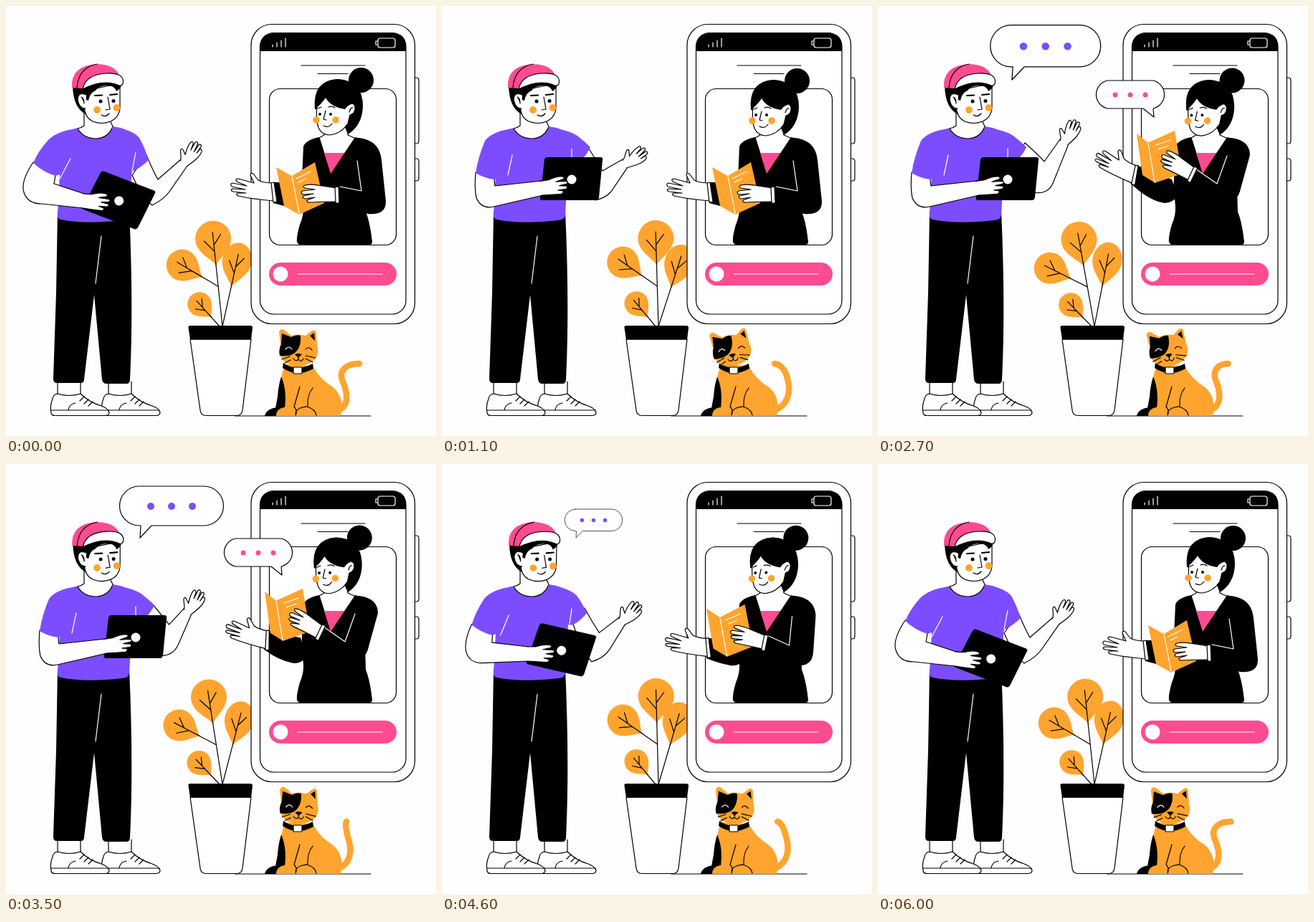
Write an HTML page that moves like this. It is 600 px wide and 600 px high and loops after 6100 ms.

```html
<!DOCTYPE html>
<html lang="en">
<head>
<meta charset="utf-8">
<title>Video call</title>
<style>
html, body { margin: 0; width: 100%; height: 100%; overflow: hidden; background: #fefdff; }
svg { display: block; width: 100%; height: 100%; }
.w { fill: #fff; stroke: #000; }
.l { fill: none; stroke: #000; }
.wl { fill: none; stroke: #fff; }
.v { fill: #7b4dff; }
.p { fill: #ff4b91; }
.o { fill: #ffa42e; }
.h { fill: #fff; }
.w, .l, .wl { stroke-width: 1.2; stroke-linecap: round; stroke-linejoin: round; }
.brow { stroke-width: 2.2; }
#leaf path { vector-effect: non-scaling-stroke; }
</style>
</head>
<body>
<svg viewBox="0 0 600 600">
<defs>
  <g id="leaf">
    <path class="o" d="M0 0C-7 -10 -25 -20 -25 -37A25 25 0 0 1 25 -37C25 -20 7 -10 0 0Z"/>
    <path class="l" d="M0 0V-46M0 -19L-13 -35M0 -28L11 -42"/>
  </g>
  <g id="shoe">
    <path class="w" d="M72 524V544H104V524"/>
    <path class="w" d="M72 541Q66 542 65 548Q61 558 63 568Q64 571.500 68 571.500H139Q144 571 144 567Q142 561 133 558Q116 553 104 541Q88 546 72 541Z"/>
    <path class="l" d="M63 564H143M103 551L109 545M109 555L115 549M115 558L121 552M87 563Q89 555 97 554"/>
  </g>
</defs>

<path class="l" d="M320 572H509"/>

<!-- plant -->
<g id="right"><path class="l" d="M0 0V-60"/><use href="#leaf" transform="translate(0 -57) scale(.82 1)"/></g>
<g id="top">
  <path class="l" d="M0 0V-88"/>
  <use href="#leaf" transform="translate(0 -86)"/>
  <g transform="translate(0 -56) rotate(-53.5)"><path class="l" d="M0 0V-28"/><use href="#leaf" transform="translate(0 -26) scale(.88)"/></g>
</g>
<g id="small"><path class="l" d="M0 0V-20"/><use href="#leaf" transform="translate(0 -17) scale(.67)"/></g>
<path class="w" d="M257 465L271 564Q272 571.500 279 571.500H322Q329 571.500 330 564L342 465Z"/>
<path d="M257 446H341Q344 446 344 449L342 465.500H257L254.500 449Q254 446 257 446Z"/>

<!-- phone -->
<g class="w">
  <path d="M570 100H573Q576 100 576 104V188Q576 192 573 192H570M570 213H573Q576 213 576 217V240Q576 244 573 244H570"/>
  <rect x="342" y="25.500" width="228.500" height="418" rx="29"/>
  <rect x="354.500" y="37.500" width="203.500" height="392.500" rx="19"/>
</g>
<path d="M355 63V56Q355 38 374 38H539Q558 38 558 56V63Z"/>
<path class="wl" d="M372 57V54M378 57V51M384 57V48M390 57V45"/>
<path class="wl" d="M522 45H540Q543 45 543 48V55Q543 58 540 58H522Q519 58 519 55V48Q519 45 522 45ZM519 49H516V54H519"/>
<path class="l" d="M412 83H501M435 94.500H477"/>
<rect class="w" x="367.500" y="115.500" width="177" height="218" rx="15"/>
<rect class="p" x="367" y="358" width="178" height="32" rx="16"/>
<circle class="h" cx="383" cy="374" r="10.500"/>
<path class="wl" d="M407 374H525"/>

<!-- woman -->
<path class="w" d="M444 170V180L437 184L453 234L488 185L477 180V165Z"/>
<path class="p" d="M441 205H477L453 235Z"/>
<path d="M437 183Q418 187 415 196L412 262Q419 285 410 305Q405 322 406 329Q407 333 411 333H507Q511 333 511 329Q508 302 502 287L499 186L487 183L453 234Z"/>
<path id="wSleeve"/>
<path id="wArm"/>
<path id="wCrease" class="wl"/>
<g id="wWave">
  <path class="w" d="M3 -13C-6 -13 -14 -14 -19 -17L-26 -26Q-30 -28 -30 -24L-25 -13L-47 -19Q-52 -19 -49 -15L-35 -9L-55 -13Q-59 -12 -56 -8L-37 -4L-55 -5Q-59 -3 -54 -1L-36 1L-48 1Q-51 3 -47 5C-34 8 -20 10 3 12"/>
  <path class="w" d="M-1 -13L3 -14L7 13L2 14Z"/>
</g>
<path id="bookL" class="o"/>
<path id="bookR" class="o"/>
<path id="bookLine" class="wl"/>
<g id="wHold">
  <path class="w" d="M0 -9L-20 -12Q-34 -15 -44 -13Q-48 -11 -44 -9L-30 -7L-47 -5Q-51 -3 -47 0L-32 -1L-46 2Q-48 5 -44 6L-30 4L-41 8Q-42 11 -37 11Q-20 10 0 10"/>
  <path class="w" d="M-2 -10L3 -11L4 12L-1 12Z"/>
</g>
<g id="wHead">
  <circle cx="495.500" cy="103.500" r="17.500"/>
  <path d="M431 144Q429 103 463 102Q498 104 498 140Q497 167 477 179L465 150Z"/>
  <path class="w" d="M434 137Q432 158 436 170Q441 180 452 180Q468 178 477 164L480 152Q488 150 487 140Q483 132 477 139L470 140Q454 137 446 124Z"/>
  <path d="M431 144Q427 104 463 102Q492 104 494 132L477 139L473 144Q453 141 446 128Q440 137 431 144Z"/>
  <path class="l" d="M479 148Q481 141 484 142M446 146L443 158L447 159M443 167Q450 171 455 164M435 143L440 141M450 141Q455 139 459 142"/>
  <circle cx="438" cy="151" r="2"/><circle cx="453" cy="151" r="2"/>
  <circle class="o" cx="433" cy="159" r="4.800"/><circle class="o" cx="460" cy="159" r="4.800"/>
</g>

<!-- man -->
<path id="mArm" class="w"/>
<g id="mWave"><path class="w" d="M-1 -6C4 -7 6 -12 11 -15Q15 -16 13 -12L10 -6C16 -9 22 -11 28 -11Q32 -10 29 -7L20 -4L32 -6Q36 -5 33 -2L21 1L33 0Q36 2 33 4L22 5L29 5Q31 7 28 9C20 12 10 9 -1 6"/></g>
<use href="#shoe" x="71"/>
<use href="#shoe"/>
<path d="M72 286L70 400L66 520Q66 526 71 526H104Q109 526 109 521L123 403L134 521Q135 527 140 527H168Q173 527 173 521Q178 420 172 286Z"/>
<path class="wl" d="M133 321L125 387"/>
<path class="v" d="M101 170Q124 196 149 168L160 170Q175 174 178 190L172 291Q172 298 162 299Q110 305 77 298Q71 297 72 290L75 235L72 200Q75 175 101 170Z"/>
<path class="w" d="M109 146V167Q105 170 100 171Q108 185 126 185Q143 184 149 168L146 162V150Z"/>
<path id="mSleeveR" class="v"/>
<path id="mCreaseR" class="wl"/>
<g id="laptop">
  <path d="M-34 -30H40Q44 -30 43 -26L38 26Q37 30 34 30H-41Q-45 30 -44 26L-38 -27Q-37 -30 -34 -30Z"/>
  <circle class="h" cx="0" cy="1" r="6.500"/>
</g>
<path id="mArmL" class="w"/>
<g id="mHold"><path class="w" d="M-2 -10L10 -10Q22 -14 30 -12Q34 -10 30 -8L20 -6L34 -5Q38 -3 34 -1L24 0L34 2Q36 5 32 6L21 6L28 8Q29 11 25 12Q10 11 -2 10"/></g>
<path id="mSleeveL" class="v"/>
<path id="mCreaseL" class="wl"/>
<g id="mHead">
  <path d="M93 112Q94 142 111 151L118 116Z"/>
  <path class="w" d="M112 118L109 140Q110 156 121 161Q134 166 146 161Q159 155 159 140V108Z"/>
  <path d="M105 115L135 100L162 106Q161 115 154 119Q151 111 142 111Q130 111 125 118Q117 121 115 132L108 130Z"/>
  <path class="w" d="M112 124Q101 119 100 130Q102 143 111 143M105 127Q109 128 109 136"/>
  <path class="p" d="M92 114Q90 84 125 81Q152 81 158 97Q118 92 107 115Z"/>
  <path class="w" d="M107 116Q111 95 141 94Q164 93 163.500 106Q163 112 158 111Q136 101 107 116Z"/>
  <path class="l" d="M99 114Q101 86 127 81"/>
  <path class="l" d="M142 127L145 144L139 145M133 152Q139 156 144 150"/>
  <path class="l brow" d="M124 125L134 124.500M145 124L155 123"/>
  <circle cx="132" cy="133" r="2.500"/><circle cx="150" cy="132.500" r="2.500"/>
  <circle class="o" cx="127" cy="145" r="4.900"/><circle class="o" cx="154.500" cy="142" r="4.900"/>
</g>

<!-- cat -->
<path id="tail" fill="none" stroke="#ffa42e" stroke-width="8.500" stroke-linecap="round"/>
<path d="M390 505L378 560Q363 562 361 572H390Z"/>
<path class="o" d="M391 500Q381 515 386 530Q391 545 388 560Q378 562 377 572H467Q473 545 455 531Q437 520 428 502Z"/>
<path d="M384 517Q394 540 387 572H374L379 545Q380 530 384 517Z"/>
<path class="o" d="M388 560Q377 562 377 572H404V561Z"/>
<path class="l" d="M410 531L402 559Q407 564 404 571M428 533Q420 543 421 559M404 568Q406 560 420 559Q432 563 433 571"/>
<path d="M387 498Q405 511 428 499L429 506Q406 519 386 505Z"/>
<rect class="w" x="401" y="504" width="12" height="9" rx="1"/>
<g id="catHead">
  <path class="o" d="M381 455Q383 449 388 452L398 460Q408 457 418 460L427 453Q432 451 433 456L434 474Q439 489 425 498Q408 506 391 498Q378 488 383 473Z"/>
  <path d="M385 457L398 462Q406 458 411 460Q412 474 406 481Q399 490 382 488Q380 480 384 472ZM424 460L430 456L431 467Z"/>
  <path class="wl" d="M390 479Q395 473 399 479"/>
  <path class="l" d="M418 479Q422 474 427 480M408 490V493M401 492Q404 497 408 493Q412 498 415 492M418 488L432 491M418 492L428 497M396 489L385 493M397 494L389 498"/>
  <path d="M403 486Q408 484 413 486L408 491Z"/>
</g>

<!-- speech -->
<g id="talkM">
  <path class="w" d="M186 31H276A27.500 27.500 0 0 1 276 86H203L187 103L188 86H186A27.500 27.500 0 0 1 186 31Z"/>
  <g class="v"><circle cx="202" cy="59" r="5"/><circle cx="231" cy="59" r="5"/><circle cx="260" cy="59" r="5"/></g>
</g>
<g id="talkW">
  <path class="w" d="M320 104H384A20 20 0 0 1 384 143L385 155L370 143H320A20 20 0 0 1 320 104Z"/>
  <g class="p"><circle cx="331" cy="124" r="3.500"/><circle cx="352" cy="124" r="3.500"/><circle cx="373" cy="124" r="3.500"/></g>
</g>
</svg>
<script>
const LOOP = 6100, STEP = 100;
const $ = id => document.getElementById(id);
const clamp = x => Math.max(0, Math.min(1, x));
const ease = p => 0.5 - 0.5 * Math.cos(Math.PI * p);
const number = /-?\d+(\.\d+)?/g;

// Blend two numbers, or two strings holding the same count of numbers.
function mix(a, b, p) {
  if (typeof a === 'number') return a + (b - a) * p;
  const to = b.match(number);
  let i = 0;
  return a.replace(number, n => (+n + (to[i++] - n) * p).toFixed(2));
}

function key(t, keys) {
  let i = 1;
  while (i < keys.length - 1 && t > keys[i][0]) i++;
  const [t0, a] = keys[i - 1], [t1, b] = keys[i];
  return mix(a, b, ease(clamp((t - t0) / (t1 - t0))));
}

const tracks = [];
const move = (id, attr, keys) => tracks.push([$(id), attr, keys]);
const lift = ([up0, up1, down0, down1]) => (id, attr, a, b) =>
  move(id, attr, [[up0, a], [up1, b], [down0, b], [down1, a]]);
const turn = (id, x, y, keys) =>
  move(id, 'transform', keys.map(([t, r]) => [t, `translate(${x} ${y}) rotate(${r})`]));
const marks = [0, 1100, 1800, 2700, 4200, 5100, LOOP];
const poses = (id, attr, list) => move(id, attr, list.map((v, i) => [marks[i], v]));
const place = (x, y, r) => `translate(${x} ${y}) rotate(${r})`;

// plant
const sway = (mid, amp) => [[0, mid], [1450, mid + amp], [3000, mid - amp], [4600, mid + amp * 0.9], [LOOP, mid]];
turn('top', 302, 447, sway(-6, 5));
turn('small', 298, 447, sway(-42, 2.5));
turn('right', 302, 447, marks.map((t, i) => [t, [12.5, 18, 12, 11, 17.5, 15, 12.5][i]]));

// man: laptop arm
const hold = lift([100, 1050, 4000, 5050]);
hold('laptop', 'transform', place(158, 271, 21), place(181, 241, 0));
hold('mHold', 'transform', place(109, 272, 4), place(140, 254, -8));
hold('mArmL', 'd',
  'M109 262L67 248Q68 243 69 236L38 218Q20 245 25 260Q30 276 50 276L108 282',
  'M139 244L74 251Q73 247 73 241L47 232Q45 255 48 268Q55 284 72 280L141 264');
hold('mSleeveL', 'd',
  'M98 171Q70 175 58 188Q44 204 38 219Q52 232 69 237L78 234Q90 215 98 190Z',
  'M98 171Q70 175 60 188Q50 212 47 233Q58 240 73 242L80 238Q92 215 98 190Z');
hold('mCreaseL', 'd', 'M90 213L75 241', 'M98 208L92 236');
hold('mCreaseR', 'd', 'M181 204L176 230', 'M181 199L181 212');
hold('mSleeveR', 'd',
  'M148 169Q176 172 186 184Q193 196 199 215Q188 226 174 232L160 220Q150 190 148 169Z',
  'M148 169Q178 173 190 182Q200 190 207 197Q203 206 196 213L172 230Q160 190 148 169Z');

// man: free arm
const armLow = 'M244 214L212 242Q206 232 196 208L176 236Q190 268 204 278Q220 270 228 259L253 223';
const armOut = 'M252 214L224 230Q215 215 203 196L190 215Q200 255 214 271Q228 268 236 259L259 225';
const armUp = 'M246 188L230 217Q222 206 205 191L196 206Q205 240 217 262Q236 268 242 250L258 196';
const armHigh = 'M254 186L232 217Q222 206 205 191L196 206Q205 240 217 260Q238 264 245 245L265 195';
const armBack = 'M244 214L224 230Q213 214 201 196L188 215Q200 255 212 273Q228 272 236 259L253 223';
const armWide = 'M252 214L213 243Q206 232 196 208L176 236Q190 268 204 280Q222 270 231 258L259 225';
poses('mArm', 'd', [armLow, armOut, armUp, armHigh, armBack, armWide, armLow]);
const palm = place(248.5, 219, -51), flat = place(256, 220, -31);
poses('mWave', 'transform', [palm, flat, place(252, 192, -62), place(260, 190, -57), palm, flat, palm]);
turn('mHead', 0, 0, [[0, '0 125 172'], [3300, '0 125 172'], [4150, '2 125 172'], [5000, '0 125 172']]);

// woman: book arm
const read = lift([1150, 1800, 4200, 5000]);
read('bookL', 'd', 'M377 225L400 238L409 291L388 279Z', 'M361 178L377 191L387 247L369 236Z');
read('bookR', 'd', 'M399 237L431 218L444 275L409 291Z', 'M376 191L414 174L424 234L386 247Z');
read('bookLine', 'd',
  'M399 238L409 289M405 241L425 231M408 246L418 241',
  'M377 192L386 246M388 194L408 187M391 200L405 195');
read('wHold', 'transform', place(461, 263, 0), place(438, 234, 28));
read('wSleeve', 'd',
  'M492 184Q521 187 524 215L530 272Q531 292 505 290L464 278L465 252L492 256L486 214Z',
  'M492 184Q519 187 519 208L506 255Q501 280 470 270L430 244L442 226L470 245L484 210Z');
read('wCrease', 'd', 'M490 216L496 258L466 252', 'M487 209L473 248L443 227');

// woman: free arm
const cuffLow = 'M374 246L414 246L420 278Q410 284 400 281Q386 279 373 275Z';
const cuffMid = 'M372 241L412 243L420 274Q410 283 400 280Q382 276 366 268Z';
const cuffUp = 'M363 223L410 242L418 264Q412 275 400 275Q378 272 352 247Z';
poses('wArm', 'd', [cuffLow, cuffLow, cuffMid, cuffUp, cuffMid, cuffLow, cuffLow]);
const handLow = place(371, 260, 0), handMid = place(367, 254, 2), handUp = place(356, 235, 18);
poses('wWave', 'transform', [handLow, handLow, handMid, handUp, handMid, handLow, handLow]);
const nod = (y, r) => `translate(0 ${y}) rotate(${r} 462 185)`;
poses('wHead', 'transform', [nod(0, 0), nod(1, 0), nod(3, -2), nod(1, -1), nod(0, -2), nod(1, 0), nod(0, 0)]);

// cat
const tailOut = 'M455 567C484 562 475 535 469 522C464 506 478 499 493 499';
const tailIn = 'M460 566C484 558 487 538 482 520C479 506 471 500 464 499';
const tailMid = mix(tailOut, tailIn, 0.65);
poses('tail', 'd', [tailOut, tailIn, mix(tailOut, tailIn, 1.08), mix(tailOut, tailIn, 0.15), tailIn, tailMid, tailOut]);
poses('catHead', 'transform', [0, -10, 8, -8, 9, -10, 0].map(r => `rotate(${r} 408 503)`));

// Overshooting entrance, plain exit.
function pop(t, start, end) {
  const u = clamp((t - start) / 900) - 1, c = 1.70158;
  const out = clamp((t - end) / 600);
  return Math.max(0, (1 + (c + 1) * u ** 3 + c * u * u) * (1 - out * out));
}

function bubble(id, x, y, s) {
  const el = $(id);
  el.setAttribute('visibility', s > 0.01 ? 'visible' : 'hidden');
  el.setAttribute('transform', `translate(${x} ${y}) scale(${s}) translate(${-x} ${-y})`);
}

function draw(now) {
  const t = Math.floor((now % LOOP) / STEP) * STEP;
  for (const [el, attr, keys] of tracks) el.setAttribute(attr, key(t, keys));
  bubble('talkM', 187, 103, pop(t, 2300, 4200));
  bubble('talkW', 385, 155, pop(t, 1280, 3900));
}

let begin;
function tick(now) {
  begin ??= now;
  draw(now - begin);
  requestAnimationFrame(tick);
}
draw(0);
requestAnimationFrame(tick);
</script>
</body>
</html>
```
